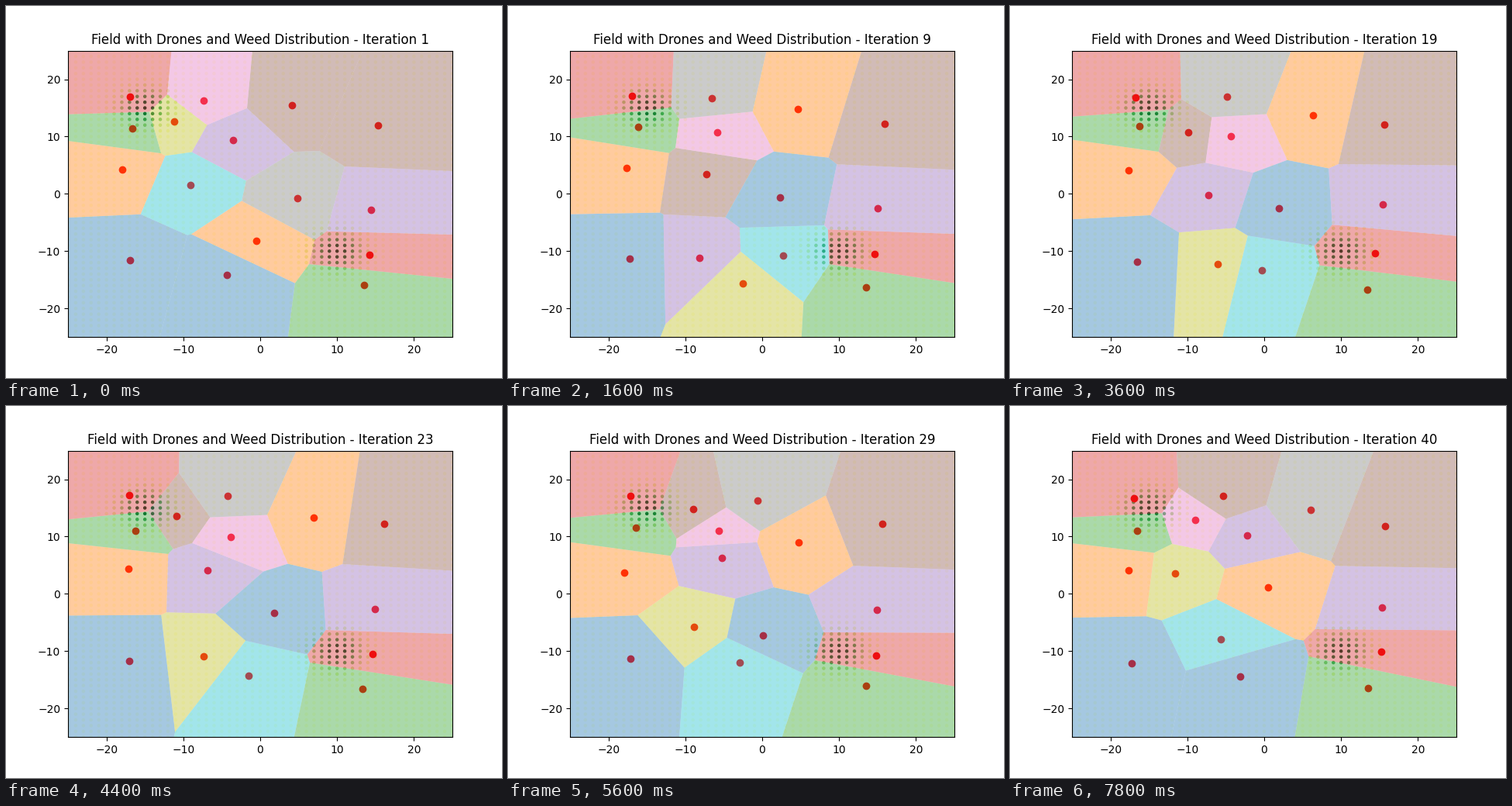
A matplotlib script for the animation above (8000 ms loop, 640 px wide and 480 px high).

```python
import numpy as np
import matplotlib.pyplot as plt
from matplotlib.animation import FuncAnimation
from matplotlib.patches import Polygon

STEPS = 40
HALF = 25
LEG_STEPS = [1, 9, 23, 40]  # when the roaming drones pass their waypoints
WOBBLE = 0.25               # how far a posted drone drifts, in field units
WEED_PATCHES = [(-15, 15), (10, -10)]
WEED_SPREAD = 10

rng = np.random.default_rng(4)


def posted(x, y):
    """A drone that hovers around one spot."""
    return np.array([x, y]) + rng.normal(0, WOBBLE, (STEPS, 2))


def roaming(*stops):
    """A drone that flies straight legs between its waypoints."""
    steps = np.arange(1, STEPS + 1)
    return np.column_stack([np.interp(steps, LEG_STEPS, axis)
                            for axis in zip(*stops)])


# The posted drones watch the edges, the roaming ones circle the middle.
paths = np.array([
    posted(-16.8, -11.6),
    posted(-17.7, 4.3),
    posted(-16.5, 11.5),
    posted(-17.1, 17.0),
    roaming((-3.5, 9.4), (-8.2, -11.2), (-6.9, 4.1), (-2.2, 10.2)),
    roaming((4.1, 15.5), (-7.3, 3.4), (-10.9, 13.6), (-5.3, 17.1)),
    roaming((-7.4, 16.3), (-5.8, 10.7), (-3.8, 9.9), (-9.0, 12.9)),
    roaming((4.8, -0.8), (-6.6, 16.7), (-4.2, 17.1), (6.0, 14.7)),
    roaming((-11.2, 12.6), (-2.5, -15.6), (-7.4, -10.9), (-11.6, 3.6)),
    roaming((-9.1, 1.5), (2.7, -10.8), (-1.5, -14.3), (-5.6, -7.9)),
    roaming((-4.3, -14.2), (2.3, -0.6), (1.8, -3.3), (-3.1, -14.4)),
    roaming((-0.5, -8.2), (4.6, 14.8), (7.0, 13.3), (0.5, 1.1)),
    posted(13.5, -16.3),
    posted(14.8, -10.4),
    posted(15.0, -2.5),
    posted(15.9, 12.1),
])


def weed_density(x, y):
    return sum(np.exp(-((x - cx) ** 2 + (y - cy) ** 2) / WEED_SPREAD)
               for cx, cy in WEED_PATCHES)


def clip(poly, normal, limit):
    """Keep the part of poly where point . normal <= limit."""
    kept = []
    for p, q in zip(poly, poly[1:] + poly[:1]):
        dp, dq = p @ normal - limit, q @ normal - limit
        if dp <= 0:
            kept.append(p)
        if dp * dq < 0:
            kept.append(p + (q - p) * dp / (dp - dq))
    return kept


def voronoi_cell(i, sites):
    r = HALF + 1
    poly = [np.array(c, float) for c in [(-r, -r), (r, -r), (r, r), (-r, r)]]
    for j, other in enumerate(sites):
        if j != i:
            normal = other - sites[i]
            poly = clip(poly, normal, normal @ (other + sites[i]) / 2)
    return np.array(poly)


fig, ax = plt.subplots(figsize=(6.4, 4.8), dpi=100)
ax.set_xlim(-HALF, HALF)
ax.set_ylim(-HALF, HALF)
title = ax.set_title("")

grid = np.arange(-HALF, HALF + 1)
gx, gy = (g.ravel() for g in np.meshgrid(grid, grid))
ax.scatter(gx, gy, c=weed_density(gx, gy), cmap="YlGn", s=5, zorder=0.5)

# The translucent cells lie over the weeds and the drones.
dots = ax.scatter([], [], color="red", zorder=0.6)
cells = [ax.add_patch(Polygon([(0, 0)] * 3, facecolor=f"C{i % 10}",
                              edgecolor="none", alpha=0.4, zorder=0.7))
         for i in range(len(paths))]


def update(frame):
    sites = paths[:, frame]
    dots.set_offsets(sites)
    for i, cell in enumerate(cells):
        cell.set_xy(voronoi_cell(i, sites))
    title.set_text("Field with Drones and Weed Distribution"
                   f" - Iteration {frame + 1}")
    return [dots, title, *cells]


anim = FuncAnimation(fig, update, frames=STEPS, interval=200,
                     repeat=True, repeat_delay=0, blit=False)
plt.show()
```
